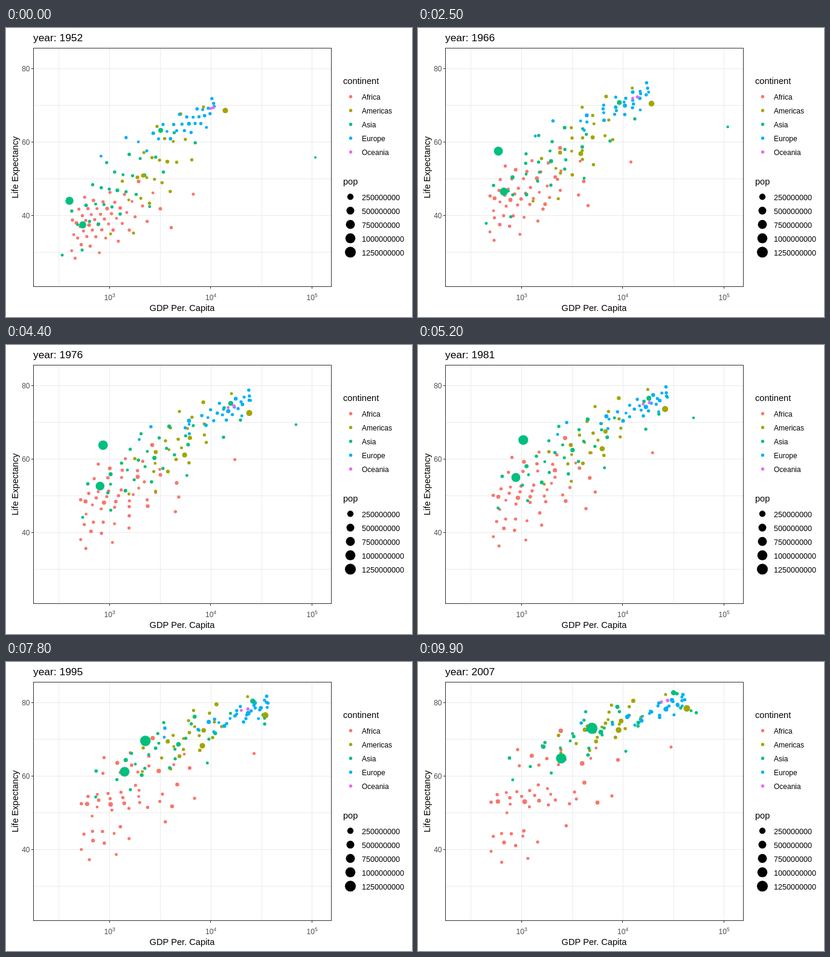
Animation of 672x480 px, one loop 10 s. Source, as an HTML page with a canvas:

```html
<!DOCTYPE html>
<html lang="en">
<head>
<meta charset="utf-8">
<title>Life expectancy and GDP</title>
<style>
  html, body { margin: 0; width: 672px; height: 480px; overflow: hidden; background: #fff; }
  canvas { display: block; }
</style>
</head>
<body>
<canvas id="stage" width="672" height="480"></canvas>
<script>
const ctx = document.getElementById('stage').getContext('2d');
const STEPS = 100, STEP_MS = 100;

// Each cloud moves between two states: centre x, centre y, spread x, spread y.
// pace eases the centre, rho ties wealth to life expectancy, skew bends the wealth tail.
const continents = [
  { name: 'Africa', color: '#F8766D', count: 52, pace: 2, rho: .4, skew: .22,
    from: [167, 317, 43, 30], to: [205, 219, 62, 56] },
  { name: 'Americas', color: '#A3A500', count: 23, pace: 1.3, rho: .65, skew: 0,
    from: [250, 232, 38, 55], to: [314, 104, 40, 24] },
  { name: 'Asia', color: '#00BF7D', count: 29, pace: 1.3, rho: .75, skew: .1,
    from: [185, 268, 52, 50], to: [290, 120, 78, 36] },
  { name: 'Europe', color: '#00B0F6', count: 30, pace: 1.6, rho: .85, skew: -.25,
    from: [290, 158, 44, 24], to: [392, 80, 40, 15] },
  { name: 'Oceania', color: '#E76BF3', count: 2, pace: 1, rho: 1, skew: 0,
    from: [341, 133, 3, 1], to: [417, 63, 17, 4] }
];

// The most visible countries: population in millions, and four evenly timed places.
const [, americas, asia] = continents;
const countries = [
  { of: americas, pop: [157, 301], path: [[363, 137], [394, 122], [420, 95], [445, 77]] },
  { of: americas, pop: [56, 190], path: [[227, 245], [283, 197], [321, 154], [332, 113]] },
  { of: asia, pop: [556, 1319], path: [[105, 287], [142, 178], [198, 143], [288, 110]] },
  { of: asia, pop: [372, 1110], path: [[127, 327], [147, 254], [173, 195], [237, 160]] },
  { of: asia, pop: [86, 127], path: [[256, 170], [358, 109], [400, 73], [423, 51]] },
  { of: asia, pop: [0, 2], path: [[512, 215], [513, 148], [414, 101], [452, 81]] }
];

const fract = v => v - Math.floor(v);
const lerp = (a, b, u) => a + (b - a) * u;
// Approximate normal quantile.
const normal = p => 4.91 * (p ** .14 - (1 - p) ** .14);
const spread = (i, ratio, seed) => normal(.02 + .96 * fract(i * ratio + seed));
const radius = millions => 2.1 + 7.11 * Math.sqrt(millions / 1318.7);

function dot(x, y, r, color) {
  ctx.fillStyle = color;
  ctx.beginPath();
  ctx.arc(x, y, r, 0, 2 * Math.PI);
  ctx.fill();
}

function text(str, x, y, size, color = '#000', align = 'left') {
  ctx.font = size + 'px "Liberation Sans", Arial, sans-serif';
  ctx.fillStyle = color;
  ctx.textAlign = align;
  ctx.fillText(str, x, y);
}

function bar(x, y, w, h, color) {
  ctx.fillStyle = color;
  ctx.fillRect(x, y, w, h);
}

function drawCloud({ color, count, pace, rho, skew, from, to }, u) {
  const eased = 1 - (1 - u) ** pace;
  const [cx, cy, sx, sy] = from.map((v, k) => lerp(v, to[k], k < 2 ? eased : u));
  const turn = .6 * u;
  for (let i = 0; i < count; i++) {
    const rank = normal((i + .5) / count);
    const z = rank * Math.cos(turn) + spread(i, .7549, .31) * Math.sin(turn);
    const side = spread(i, .618, .17);
    const x = cx + sx * (z + skew * (z * z - 1));
    const y = cy - sy * (rho * z + Math.sqrt(1 - rho * rho) * side);
    const millions = 2 + 8 * fract(i * .4142 + .2) + 70 * (.4 + u) * fract(i * .7321) ** 8;
    dot(x, y, radius(millions), color);
  }
}

function drawCountry({ of, pop, path }, u) {
  const k = Math.min(2, Math.floor(u * 3));
  const [x, y] = path[k].map((v, j) => lerp(v, path[k + 1][j], u * 3 - k));
  dot(x, y, radius(lerp(...pop, u)), of.color);
}

function drawAxes() {
  const grey = '#4D4D4D';
  for (let k = 0; k < 6; k++) {
    bar(45, 67 + 61 * k, 494, 1, '#EBEBEB');
    bar(Math.floor(87.6 + 83.85 * k), 33, 1, 397, '#EBEBEB');
  }
  for (let k = 0; k < 3; k++) {
    const x = 171 + 167.5 * k, y = 67 + 122 * k;
    bar(Math.floor(x), 430, 1, 3, '#333');
    bar(42, y, 3, 1, '#333');
    text('10', x - 8.5, 452, 12, grey);
    text(3 + k, x + 5, 447, 8.5, grey);
    text(80 - 20 * k, 39.5, y + 5, 12, grey, 'right');
  }
  text('GDP Per. Capita', 291.5, 470, 14.6, '#000', 'center');
  ctx.save();
  ctx.translate(20, 231.5);
  ctx.rotate(-Math.PI / 2);
  text('Life Expectancy', 0, 0, 14.6, '#000', 'center');
  ctx.restore();
}

function drawLegend() {
  text('continent', 558, 93, 14.6);
  continents.forEach(({ name, color }, k) => {
    dot(570.5, 114 + 23 * k, 2.7, color);
    text(name, 589, 119 + 23 * k, 12);
  });
  text('pop', 558, 260, 14.6);
  for (let k = 0; k < 5; k++) {
    const millions = 250 * (k + 1);
    dot(570, 280.3 + 23 * k, radius(millions), '#000');
    text(millions * 1e6, 589, 286 + 23 * k, 12.6);
  }
}

function draw(step) {
  const u = step / (STEPS - 1);
  bar(0, 0, 672, 480, '#fff');
  drawAxes();
  continents.forEach(c => drawCloud(c, u));
  countries.forEach(c => drawCountry(c, u));
  ctx.strokeStyle = '#333';
  ctx.strokeRect(45.5, 33.5, 493, 396);
  text('year: ' + Math.round(lerp(1952, 2007, u)), 45, 22, 17.4);
  drawLegend();
}

const start = performance.now();
function tick() {
  draw(Math.floor((performance.now() - start) / STEP_MS) % STEPS);
  requestAnimationFrame(tick);
}
tick();
</script>
</body>
</html>
```
